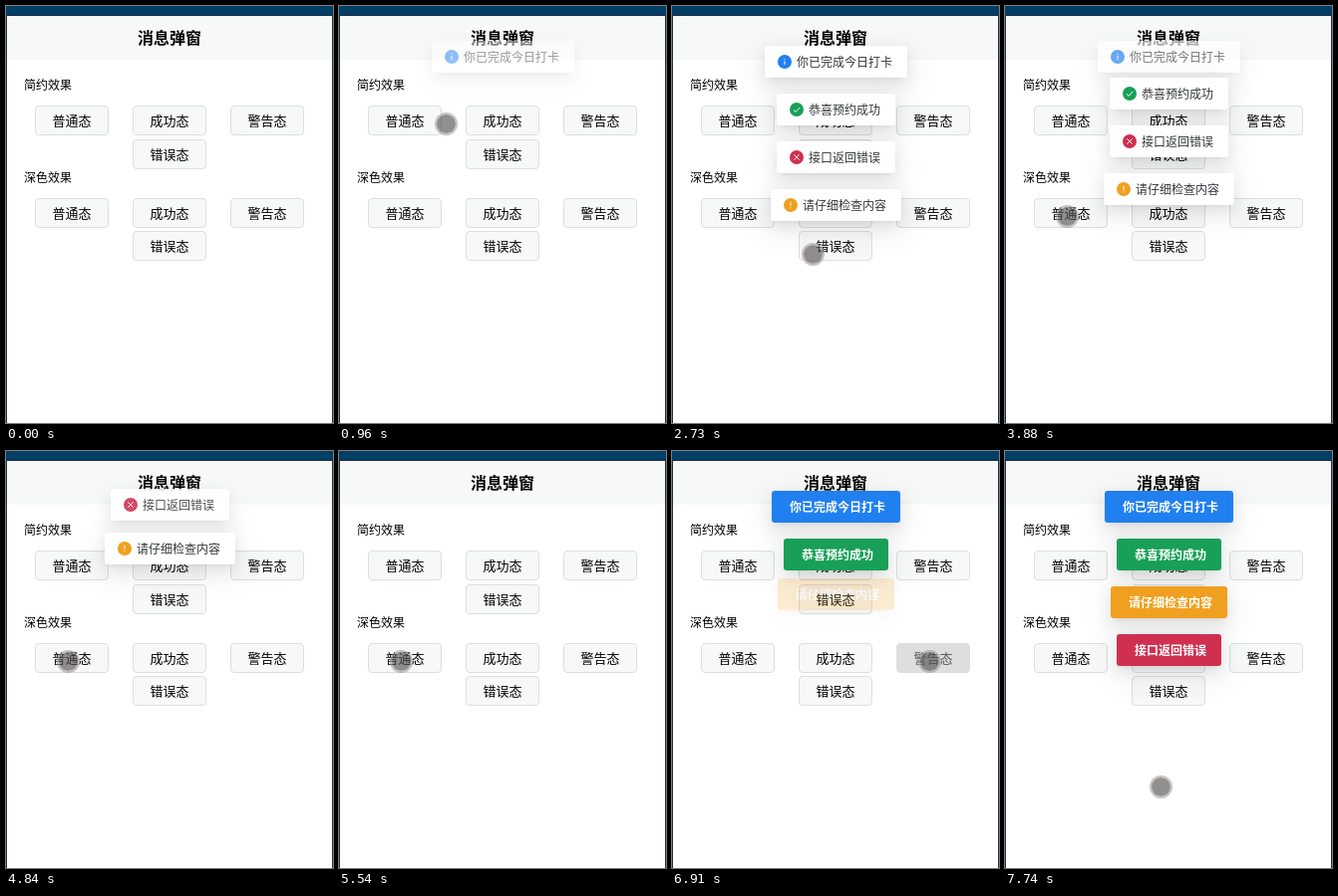
An HTML page for the animation above (8 s loop, 328x419 px).

```html
<!DOCTYPE html>
<html lang="zh-CN">
<head>
<meta charset="utf-8">
<style>
html, body { margin: 0; width: 100%; height: 100%; overflow: hidden; }
body { font-family: "Noto Sans CJK SC", "Noto Sans CJK", sans-serif; background: #fff; color: #000; }
body * { position: absolute; box-sizing: border-box; white-space: nowrap; }
#stage { width: 328px; height: 419px; overflow: hidden; }
#bar { width: 328px; height: 10px; background: #023e66; }
#page { top: 9px; width: 328px; height: 410px; border: solid #1d2f40; border-width: 1px 1px 0; }
#title { width: 326px; height: 44px; background: #f7f8f8; font-size: 16px; font-weight: bold; line-height: 43px; text-align: center; }
.label { left: 18px; font-size: 12px; line-height: 20px; }
.button { width: 74px; height: 30px; border: 1px solid #dcdee0; border-radius: 4px; background: #f7f8f8;
  font-size: 13px; line-height: 27px; text-align: center; }
.button.pressed { background: #dedede; color: rgba(0,0,0,.6); }
.toast { height: 32px; border-radius: 3px; background: #fff; color: #333639; font-size: 12px; line-height: 31px;
  box-shadow: 0 3px 6px -4px rgba(0,0,0,.12), 0 6px 16px rgba(0,0,0,.08), 0 9px 28px 8px rgba(0,0,0,.05); }
.toast.dark { color: #fff; font-weight: bold; }
.toast svg { left: 13px; top: 9px; width: 14px; height: 14px; }
#cursor { width: 23px; height: 23px; margin: -11.5px; border-radius: 50%; background: rgba(85,80,81,.64);
  background-clip: padding-box; border: 2px solid rgba(165,155,156,.6); }
</style>
</head>
<body>
<div id="stage">
  <div id="bar"></div>
  <div id="page"><div id="title">消息弹窗</div></div>
  <div class="label" style="top:69px">简约效果</div>
  <div class="label" style="top:162px">深色效果</div>
</div>
<script>
const LOOP = 8000, FADE = 350, SLOT = 48;
const PRESS = 130, RELEASE = 110; // around a toast's start
const SPEED = 0.6;                // cursor, px per ms
const stage = document.getElementById('stage');

const kinds = {
  info: { name: '普通态', text: '你已完成今日打卡', color: '#2080f0', icon: 'M8 7V11.6M8 4.4V5.6' },
  success: { name: '成功态', text: '恭喜预约成功', color: '#18a058', icon: 'M4.4 8.3L7 10.8L11.6 5.8' },
  warning: { name: '警告态', text: '请仔细检查内容', color: '#f0a020', icon: 'M8 4.2V9M8 10.6V11.8' },
  error: { name: '错误态', text: '接口返回错误', color: '#d03050', icon: 'M5 5L11 11M11 5L5 11' }
};

function add(className, css, html = '') {
  const el = document.createElement('div');
  el.className = className;
  Object.assign(el.style, css);
  el.innerHTML = html;
  return stage.appendChild(el);
}

// Three buttons in a row, the last one centred below
function addButtons(top, rowGap) {
  const buttons = {};
  Object.keys(kinds).forEach((kind, i) => {
    const x = 29 + 98 * (i < 3 ? i : 1), y = top + (i < 3 ? 0 : rowGap);
    buttons[kind] = { x, y, el: add('button', { left: x + 'px', top: y + 'px' }, kinds[kind].name) };
  });
  return buttons;
}

const lightButtons = addButtons(100, 34), darkButtons = addButtons(193, 33);

function addToast(kind, dark, start, end = Infinity) {
  const { text, color, icon } = kinds[kind];
  const inset = dark ? 18 : 32;
  const width = text.length * 12 + inset + 15;
  const svg = `<svg viewBox="0 0 16 16"><circle cx="8" cy="8" r="8" fill="${color}"/>
    <path d="${icon}" fill="none" stroke="#fff" stroke-width="1.1"/></svg>`;
  const el = add(dark ? 'toast dark' : 'toast',
    { left: Math.floor(164.5 - width / 2) + 'px', width: width + 'px', background: dark ? color : '#fff' },
    `${dark ? '' : svg}<span style="left:${inset}px">${text}</span>`);
  return { el, start, end, button: (dark ? darkButtons : lightButtons)[kind] };
}

const light = [
  addToast('info', false, 790, 3745),
  addToast('success', false, 1160, 4160),
  addToast('error', false, 1685, 4765),
  addToast('warning', false, 2020, 4940)
];
const dark = [
  addToast('info', true, 5990),
  addToast('success', true, 6450),
  addToast('warning', true, 6812),
  addToast('error', true, 7290)
];
const toasts = [...light, ...dark];

const path = [];
const moveTo = (t, x, y) => path.push({ t, x, y });

// Travel to a toast's button and stay until it is released
function visit({ start, button }) {
  const last = path[path.length - 1], x = button.x + 33, y = button.y + 18;
  const travel = Math.hypot(x - last.x, y - last.y) / SPEED;
  moveTo(Math.min(last.t + travel, start - PRESS), x, y);
  moveTo(start + RELEASE, x, y);
}

moveTo(130, 193, 304);
light.forEach(visit);
moveTo(2640, 190, 274);
dark.forEach(visit);
moveTo(7560, 160, 357);
moveTo(7700, 156, 337);
moveTo(LOOP, 156, 337);

const cursor = add('', {});
cursor.id = 'cursor';

const clamp = v => Math.max(0, Math.min(1, v));
const ease = v => (v = clamp(v), v * v * (3 - 2 * v));

function drawToasts(t) {
  let top = 40;
  for (const { el, start, end } of toasts) {
    const enter = ease((t - start) / FADE), leave = ease((t - end) / FADE);
    const shown = t >= start && leave < 1;
    el.style.display = shown ? '' : 'none';
    el.style.opacity = enter * (1 - leave);
    el.style.top = top - 10 * (1 - enter) - 16 * leave + 'px';
    if (shown) top += SLOT * (1 - leave);
  }
}

function drawButtons(t) {
  for (const { start, button } of toasts)
    button.el.classList.toggle('pressed', t >= start - PRESS && t < start + RELEASE);
}

function drawCursor(t) {
  cursor.style.display = t < path[0].t ? 'none' : '';
  const i = Math.max(1, path.findIndex(p => p.t > t));
  const a = path[i - 1], b = path[i];
  const u = clamp((t - a.t) / (b.t - a.t));
  cursor.style.left = a.x + (b.x - a.x) * u + 'px';
  cursor.style.top = a.y + (b.y - a.y) * u + 'px';
}

function frame() {
  const t = performance.now() % LOOP;
  drawToasts(t);
  drawButtons(t);
  drawCursor(t);
  requestAnimationFrame(frame);
}
frame();
</script>
</body>
</html>
```
